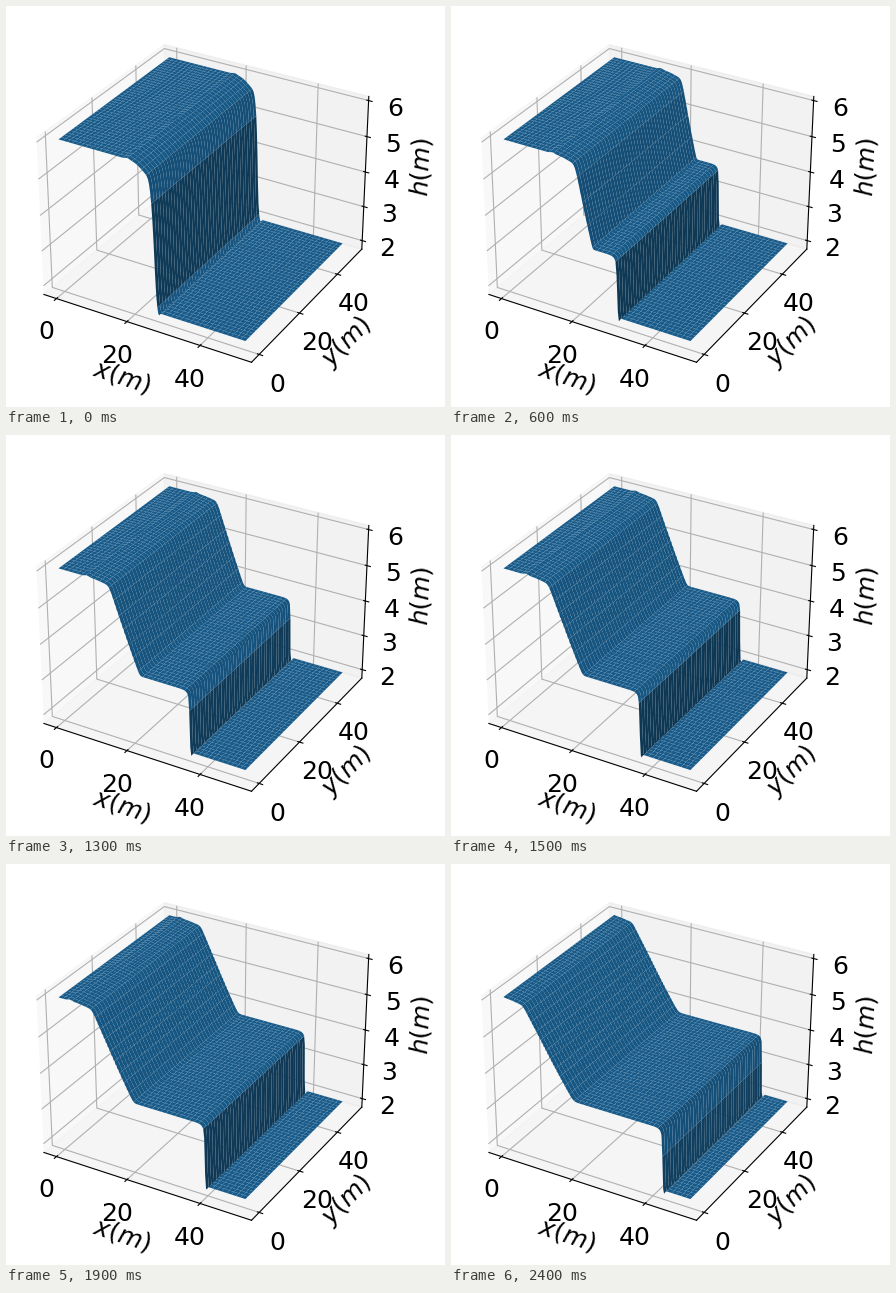
Animation of 439 by 401 pixels, one loop 2500 ms. Source, as a matplotlib script:

```python
import numpy as np
import matplotlib.pyplot as plt
from matplotlib.animation import FuncAnimation

W, H, DPI = 439, 401, 100
FRAMES, STEP_MS = 25, 100

G = 9.81
LENGTH, NODES = 50, 201
H_LEFT, H_MID, H_RIGHT = 6.0, 3.7, 2.0
C_LEFT = np.sqrt(G * H_LEFT)

plt.rcParams["font.size"] = 18

x = np.linspace(0, LENGTH, NODES)
X, Y = np.meshgrid(x, x)
ODD_EVEN = (-1.0) ** np.arange(NODES)


def softplus(v, width):
    return width * np.logaddexp(0, v / width)


def bump(center, width):
    return np.exp(-((x - center) / width) ** 2)


def depth(t):
    """Dam-break water depth: rarefaction, plateau and shock."""
    tau = t + 0.3
    x0 = 26 + 1.1 * np.exp(-2 * t)
    head = x0 - C_LEFT * tau

    # rarefaction fan, rounded where it meets the still water
    xi = np.minimum((x - x0) / tau, 2 * C_LEFT)
    fan = (2 * C_LEFT - xi) ** 2 / (9 * G)
    h = H_LEFT - softplus(H_LEFT - fan, 0.168 / tau)
    h -= (0.06 + 0.24 * np.exp(-3 * t)) * bump(head, 3)
    h += 0.03 * bump(head - 6, 0.8)
    h = H_MID + softplus(h - H_MID, 0.05)

    # slight grid-scale ripple on the slope
    a = np.clip((fan - H_MID) / (H_LEFT - H_MID), 0, 1)
    h += 0.08 * min(t, 1) * a * (1 - a) * ODD_EVEN

    # moving shock: rounded crest, steep face, small dip ahead
    start = np.exp(-8 * t)
    front = 26.3 + 6.77 * t - 0.5 * start
    h -= 0.25 * np.exp(-np.abs(x - front) / 0.5)
    steep = 0.08 + 0.14 * start
    step = 1 / (1 + np.exp(np.clip((x - front) / steep, -50, 50)))
    dip = 0.1 * bump(front + 0.4 + 0.4 * start, 0.35)
    return H_RIGHT + (h - H_RIGHT) * step - dip


fig = plt.figure(figsize=((W + 1e-6) / DPI, (H + 1e-6) / DPI), dpi=DPI)
SIDE, PAD = 369.6, 10
ax = fig.add_axes([PAD / W, 1 - (PAD + SIDE) / H, SIDE / W, SIDE / H],
                  projection="3d")


def padded(lo, hi):
    pad = (hi - lo) / 48
    return lo - pad, hi + pad


ax.set_xlim(*padded(-2.5, 52.5))
ax.set_ylim(*padded(-2.5, 52.5))
ax.set_zlim(*padded(1.835, 6.025))
ax.set_xticks([0, 20, 40])
ax.set_yticks([0, 20, 40])
ax.set_zticks([2, 3, 4, 5, 6])
ax.set_xlabel("$x (m)$")
ax.set_ylabel("$y (m)$")
ax.set_zlabel("$h (m)$")

surface = None


def update(i):
    global surface
    if surface is not None:
        surface.remove()
    Z = np.tile(depth(i * STEP_MS / 1000), (NODES, 1))
    surface = ax.plot_surface(X, Y, Z, color="C0")
    return [surface]


anim = FuncAnimation(fig, update, frames=FRAMES, interval=STEP_MS,
                     init_func=lambda: [], repeat=True)
plt.show()
```
